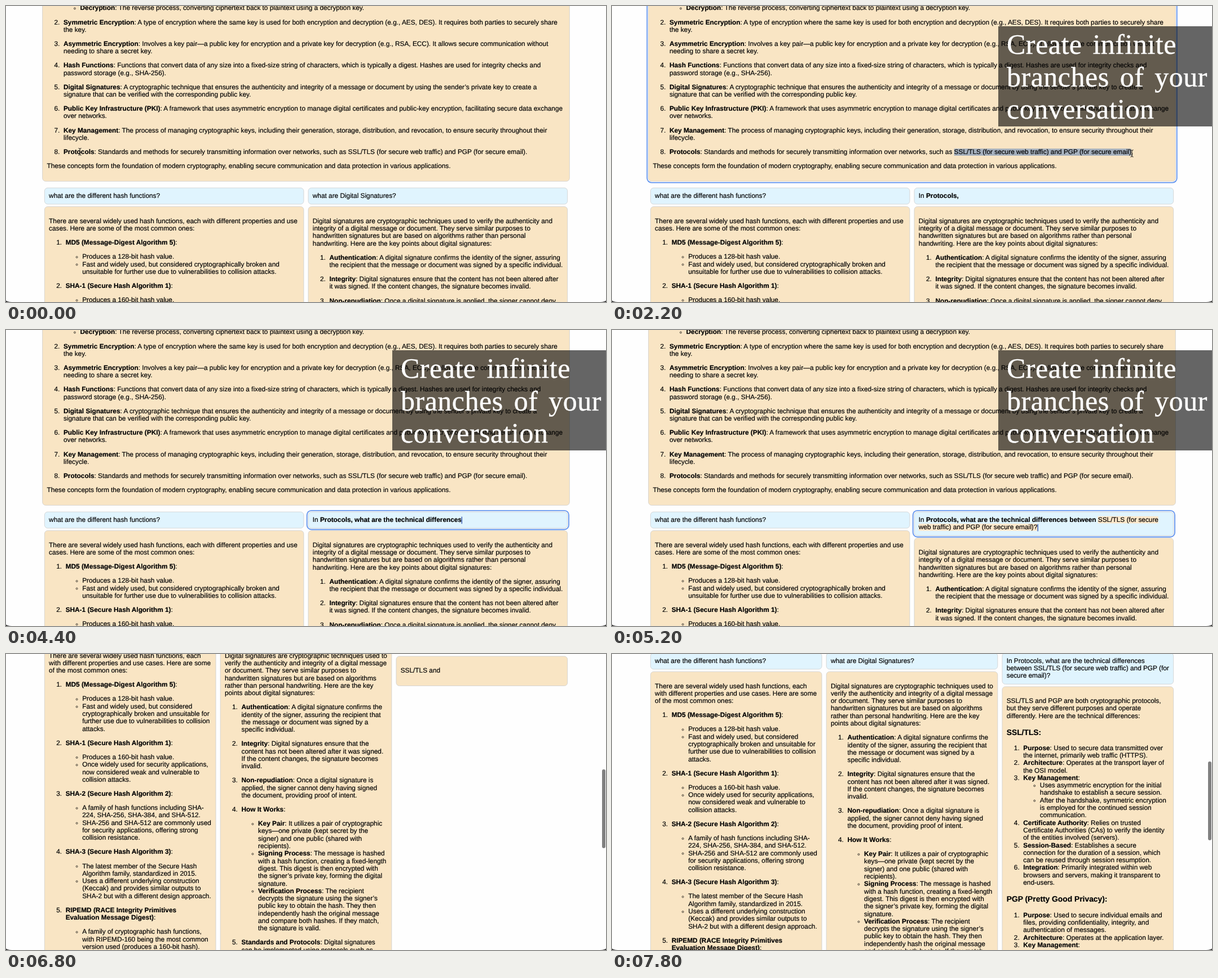
Animation of 1064 by 526 pixels, one loop 8000 ms. Source, as an HTML page:

```html
<!DOCTYPE html>
<html lang="en">
<head>
<meta charset="utf-8">
<title>Branching conversation</title>
<style>
@counter-style spaced { system: extends decimal; suffix: ".\a0\a0"; }
html, body { margin: 0; width: 100%; height: 100%; overflow: hidden; background: #222; }
#stage { position: relative; width: 1064px; height: 526px; overflow: hidden; background: #fefefe;
  border-radius: 0 0 10px 10px / 0 0 3px 3px; }
#page { position: absolute; left: 0; top: 0; width: 1440px; height: 712px; transform-origin: 0 0;
  font: 16px/18px "Liberation Sans", Arial, Helvetica, sans-serif; color: #000;
  text-rendering: geometricPrecision; -webkit-text-stroke: .25px #000; }
ol { list-style-type: spaced; }
.q, .a { box-sizing: border-box; border: 1px solid #ccc; border-radius: 8px; padding: 10px; }
.q { background: #e0f4fe; margin-bottom: 5px; min-height: 40px; }
.a { background: #f9e5c4; }
.q, p, li, h3 { white-space: pre; }
h3 { font-size: 18.72px; line-height: 22px; margin: 18.72px 0; }
#top { position: absolute; left: 87px; width: 1266px; bottom: 290px; }
.row { position: absolute; left: 92px; top: 437px; width: 1256px; display: flex; gap: 10px; align-items: flex-start; }
.row[hidden] { display: none; }
.row > div { flex: 1 1 0; min-width: 0; }
.focus { box-shadow: 0 0 0 1.5px #fefefe, 0 0 0 4px #6496ee; }
.sel { background: linear-gradient(#a5b0bd, #a5b0bd) no-repeat 0 0 / 0 100%; }
mark { background: #fde8cb; color: inherit; }
.caret { position: relative; }
.caret::after { content: ""; position: absolute; left: 0; top: 1px; width: 2px; height: 17px; background: #3d5fb5; }
#banner { position: absolute; left: 685px; top: 35.5px; width: 379px; height: 178.5px; box-sizing: border-box;
  padding: 4.5px 0 0 15px; background: rgba(0, 0, 0, .6); color: #fff; white-space: pre;
  font: 50px/57.5px "Liberation Serif", "Times New Roman", serif; letter-spacing: .5px; word-spacing: 6px;
  text-rendering: geometricPrecision; -webkit-text-stroke: .4px #fff; }
#cursor { position: absolute; left: -4px; top: -7px; }
#thumb { position: absolute; left: 1057px; top: 0; width: 6px; height: 140px; border-radius: 3px; background: #808080; }
</style>
</head>
<body>
<div id="stage">
  <div id="page">
    <div id="top" class="a"></div>
    <div id="two" class="row"></div>
    <div id="three" class="row"></div>
  </div>
  <div id="banner">Create infinite
branches of your
conversation</div>
  <svg id="cursor" width="8" height="14" fill="none" stroke="#111">
    <path d="M1.5 .8Q4 .8 4 2.5Q4 .8 6.5 .8M4 2.5V11.5M1.5 13.2Q4 13.2 4 11.5Q4 13.2 6.5 13.2M2.8 9.5H5.2"/>
  </svg>
  <div id="thumb"></div>
</div>
<script>
const $ = id => document.getElementById(id);

// Markup: *bold*, | line break, [selectable]
const fmt = s => s.replace(/\*(.+?)\*/g, '<b>$1</b>').replace(/\[(.+?)\]/g, '<span class="sel">$1</span>')
  .replace(/\|/g, '\n');
const p = s => `<p>${fmt(s)}</p>`;
const h3 = s => `<h3>${fmt(s)}</h3>`;
const list = (tag, items) => `<${tag}>${items.map(s => `<li>${s}</li>`).join('')}</${tag}>`;
const ul = (...items) => list('ul', items.map(fmt));
const ol = (...items) => list('ol', items);
const col = (q, a) => `<div><div class="q">${fmt(q)}</div><div class="a">${a}</div></div>`;

const ask1 = 'what are the different hash functions?';
const ask2 = 'what are Digital Signatures?';
const quote = 'SSL/TLS (for secure|web traffic) and PGP (for secure email)';

$('top').innerHTML = ol(
  p('*Encryption and Decryption*:') +
    ul('*Decryption*: The reverse process, converting ciphertext back to plaintext using a decryption key.'),
  p('*Symmetric Encryption*: A type of encryption where the same key is used for both encryption and decryption (e.g., AES, DES). It requires both parties to securely share|the key.'),
  p('*Asymmetric Encryption*: Involves a key pair—a public key for encryption and a private key for decryption (e.g., RSA, ECC). It allows secure communication without|needing to share a secret key.'),
  p('*Hash Functions*: Functions that convert data of any size into a fixed-size string of characters, which is typically a digest. Hashes are used for integrity checks and|password storage (e.g., SHA-256).'),
  p('*Digital Signatures*: A cryptographic technique that ensures the authenticity and integrity of a message or document by using the sender’s private key to create a|signature that can be verified with the corresponding public key.'),
  p('*Public Key Infrastructure (PKI)*: A framework that uses asymmetric encryption to manage digital certificates and public-key encryption, facilitating secure data exchange|over networks.'),
  p('*Key Management*: The process of managing cryptographic keys, including their generation, storage, distribution, and revocation, to ensure security throughout their|lifecycle.'),
  p('[*Protocols*]: Standards and methods for securely transmitting information over networks, such as [SSL/TLS (for secure web traffic) and PGP (for secure email)].')
) + p('These concepts form the foundation of modern cryptography, enabling secure communication and data protection in various applications.');

$('two').innerHTML = col(ask1,
  p('There are several widely used hash functions, each with different properties and use|cases. Here are some of the most common ones:') +
  ol(
    p('*MD5 (Message-Digest Algorithm 5)*:') +
      ul('Produces a 128-bit hash value.',
        'Fast and widely used, but considered cryptographically broken and|unsuitable for further use due to vulnerabilities to collision attacks.'),
    p('*SHA-1 (Secure Hash Algorithm 1)*:') + ul('Produces a 160-bit hash value.')
  )) + col(ask2,
  p('Digital signatures are cryptographic techniques used to verify the authenticity and|integrity of a digital message or document. They serve similar purposes to|handwritten signatures but are based on algorithms rather than personal|handwriting. Here are the key points about digital signatures:') +
  ol(
    p('*Authentication*: A digital signature confirms the identity of the signer, assuring|the recipient that the message or document was signed by a specific individual.'),
    p('*Integrity*: Digital signatures ensure that the content has not been altered after|it was signed. If the content changes, the signature becomes invalid.'),
    p('*Non-repudiation*: Once a digital signature is applied, the signer cannot deny')
  ));

$('three').innerHTML = col(ask1,
  p('There are several widely used hash functions, each|with different properties and use cases. Here are some|of the most common ones:') +
  ol(
    p('*MD5 (Message-Digest Algorithm 5)*:') +
      ul('Produces a 128-bit hash value.',
        'Fast and widely used, but considered|cryptographically broken and unsuitable for|further use due to vulnerabilities to collision|attacks.'),
    p('*SHA-1 (Secure Hash Algorithm 1)*:') +
      ul('Produces a 160-bit hash value.',
        'Once widely used for security applications,|now considered weak and vulnerable to|collision attacks.'),
    p('*SHA-2 (Secure Hash Algorithm 2)*:') +
      ul('A family of hash functions including SHA-|224, SHA-256, SHA-384, and SHA-512.',
        'SHA-256 and SHA-512 are commonly used|for security applications, offering strong|collision resistance.'),
    p('*SHA-3 (Secure Hash Algorithm 3)*:') +
      ul('The latest member of the Secure Hash|Algorithm family, standardized in 2015.',
        'Uses a different underlying construction|(Keccak) and provides similar outputs to|SHA-2 but with a different design approach.'),
    p('*RIPEMD (RACE Integrity Primitives*|*Evaluation Message Digest)*:') +
      ul('A family of cryptographic hash functions,|with RIPEMD-160 being the most common|version used (produces a 160-bit hash).')
  )) + col(ask2,
  p('Digital signatures are cryptographic techniques used to|verify the authenticity and integrity of a digital message|or document. They serve similar purposes to|handwritten signatures but are based on algorithms|rather than personal handwriting. Here are the key|points about digital signatures:') +
  ol(
    p('*Authentication*: A digital signature confirms the|identity of the signer, assuring the recipient that|the message or document was signed by a|specific individual.'),
    p('*Integrity*: Digital signatures ensure that the|content has not been altered after it was signed.|If the content changes, the signature becomes|invalid.'),
    p('*Non-repudiation*: Once a digital signature is|applied, the signer cannot deny having signed|the document, providing proof of intent.'),
    p('*How It Works*:') +
      ul('*Key Pair*: It utilizes a pair of cryptographic|keys—one private (kept secret by the|signer) and one public (shared with|recipients).',
        '*Signing Process*: The message is hashed|with a hash function, creating a fixed-length|digest. This digest is then encrypted with|the signer’s private key, forming the digital|signature.',
        '*Verification Process*: The recipient|decrypts the signature using the signer’s|public key to obtain the hash. They then|independently hash the original message|and compare both hashes. If they match,|the signature is valid.'),
    p('*Standards and Protocols*: Digital signatures|can be implemented using protocols such as')
  )) + col('In Protocols, what are the technical differences|between SSL/TLS (for secure web traffic) and PGP (for|secure email)?',
  p('SSL/TLS and PGP are both cryptographic protocols,|but they serve different purposes and operate|differently. Here are the technical differences:') +
  h3('SSL/TLS:') +
  ol(...[
    '*Purpose*: Used to secure data transmitted over|the internet, primarily web traffic (HTTPS).',
    '*Architecture*: Operates at the transport layer of|the OSI model.'].map(fmt),
    fmt('*Key Management*:') +
      ul('Uses asymmetric encryption for the initial|handshake to establish a secure session.',
        'After the handshake, symmetric encryption|is employed for the continued session|communication.'),
    ...['*Certificate Authority*: Relies on trusted|Certificate Authorities (CAs) to verify the identity|of the entities involved (servers).',
    '*Session-Based*: Establishes a secure|connection for the duration of a session, which|can be reused through session resumption.',
    '*Integration*: Primarily integrated within web|browsers and servers, making it transparent to|end-users.'].map(fmt)) +
  h3('PGP (Pretty Good Privacy):') +
  ol(...[
    '*Purpose*: Used to secure individual emails and|files, providing confidentiality, integrity, and|authentication of messages.',
    '*Architecture*: Operates at the application layer.',
    '*Key Management*:'].map(fmt)));

const prompt = $('two').querySelectorAll('.q')[1];
const [selWord, selQuote] = $('top').querySelectorAll('.sel');
const answer = $('three').lastElementChild.querySelector('.a');
const blocks = answer.querySelectorAll('p, h3, ol, ul, li');
const parts = [];
const walker = document.createTreeWalker(answer, NodeFilter.SHOW_TEXT);
for (let start = 0; walker.nextNode();) {
  const node = walker.currentNode, text = node.data;
  parts.push({ node, text, start });
  start += text.length;
}

const clamp = x => Math.max(0, Math.min(1, x));
const within = (t, a, b) => t >= a && t < b;

// Interpolates a row of [time, ...values]
function track(keys, t) {
  const i = keys.findIndex(k => k[0] > t);
  if (i < 0) return keys[keys.length - 1].slice(1);
  if (!i) return keys[0].slice(1);
  const a = keys[i - 1], b = keys[i], u = (t - a[0]) / (b[0] - a[0]);
  return a.slice(1).map((v, j) => v + (b[j + 1] - v) * u);
}
const mouse = [[0, 131, 259], [400, 131, 259], [800, 680, 338], [1200, 680, 338],
  [1600, 607, 261], [2200, 922, 262], [2400, 922, 262], [2600, 690, 338]];

const typed = (text, t, from, rate) => text.slice(0, Math.max(0, Math.floor((t - from) * rate)));

function promptHtml(t) {
  if (t < 800) return ask2;
  let bold = t < 1200 ? '' : t < 1400 ? 'Protocols' : 'Protocols,';
  bold += typed(' what are the technical differences between ', t, 2980, .025);
  const pasted = t >= 5000 ? `<mark>${fmt(quote)}${t >= 5200 ? '?' : ''}</mark>` : '';
  return typed('In ', t, 780, .01) + `<b>${bold}</b>` + pasted;
}

function stream(count) {
  for (const { node, text, start } of parts) node.data = text.slice(0, Math.max(0, count - start));
  for (const el of blocks) el.hidden = !el.textContent;
}

function render(t) {
  const split = t >= 6600;
  const [scroll] = split ? track([[7400, 513], [7800, 440]], t) : [0];
  $('page').style.transform = `scale(${1064 / 1440}) translateY(${-scroll}px)`;
  $('two').hidden = split;
  $('three').hidden = !split;
  $('thumb').style.display = split ? '' : 'none';
  $('thumb').style.transform = `translateY(${205 - (513 - scroll) * .192}px)`;
  stream(t < 6800 ? 0 : Math.floor(11 + (t - 6800) * 1.5));

  const editing = within(t, 800, 1600) || within(t, 2600, 6600);
  prompt.innerHTML = promptHtml(t) + (editing ? '<i class="caret"></i>' : '');
  prompt.classList.toggle('focus', editing);
  $('top').classList.toggle('focus', within(t, 200, 800) || within(t, 1600, 2600));
  selWord.style.backgroundSize = `${within(t, 200, 800) ? 100 : 0}% 100%`;
  selQuote.style.backgroundSize = `${t < 2600 ? clamp((t - 1600) / 600) * 100 : 0}% 100%`;

  const [x, y] = track(mouse, t);
  $('cursor').style.transform = `translate(${x}px, ${y}px)`;
  $('cursor').style.display = t < 2800 ? '' : 'none';
  $('banner').style.opacity = Math.min(clamp((t - 1200) / 600), clamp((6000 - t) / 600));
}

const began = performance.now();
let shown = -1;
function tick() {
  // The picture advances in 200 ms steps
  const t = Math.floor((performance.now() - began) % 8000 / 200) * 200;
  if (t !== shown) render(shown = t);
  requestAnimationFrame(tick);
}
tick();
</script>
</body>
</html>
```
